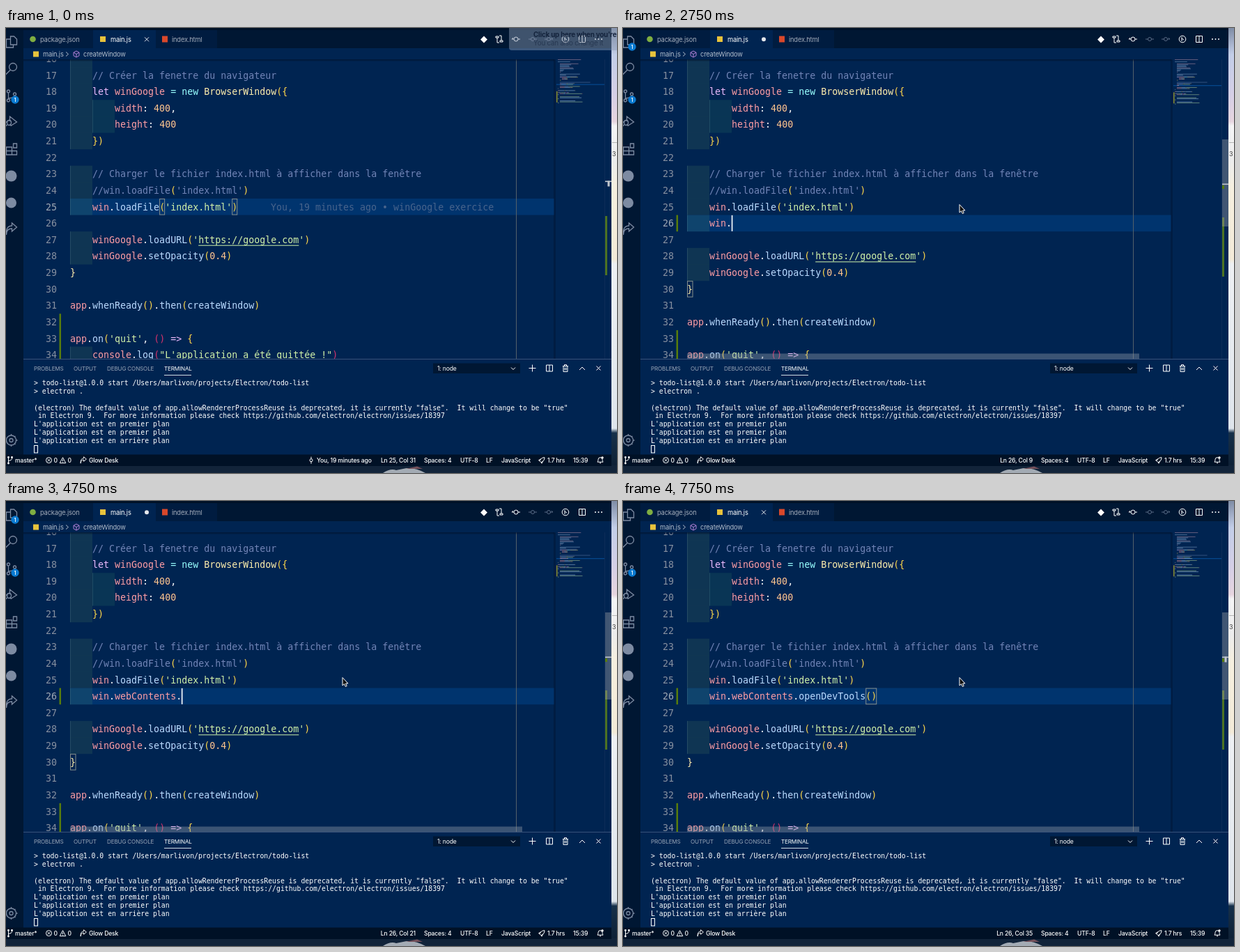
Write an HTML page that moves like this. It is 877x639 px and loops after 8000 ms.

```html
<!DOCTYPE html>
<html lang="fr">
<head>
<meta charset="utf-8">
<title>Code editor</title>
<style>
html, body { margin: 0; width: 100%; height: 100%; overflow: hidden; background: #002451; }
svg { display: block; width: 877px; height: 639px; }
text { white-space: pre; }
.mono { font-family: "DejaVu Sans Mono", monospace; }
.ui { font-family: Inter, "Open Sans", sans-serif; letter-spacing: -0.02em; }
</style>
</head>
<body>
<svg id="stage" viewBox="0 0 877 639" xmlns="http://www.w3.org/2000/svg"></svg>
<script>
const LOOP = 8000, CH = 8.008, ROW = 23.62, LEFT = 92;
const COLOR = {
  c: '#7285b7', k: '#ebbbff', o: '#99ffff', r: '#ff9da4', w: '#ffffff', n: '#ffc58f',
  t: '#ffeead', f: '#bbdaff', s: '#d1f1a9', y: '#ffd84a', m: '#d6336c', u: '#d1f1a9'
};
const OLIVE = '#587c0c', TEAL = '#1b81a8', GREY = '#7d8ba2';

const rowY = n => 67.8 + ROW * (n - 17);
const colX = c => LEFT + c * CH;
const esc = s => s.replace(/&/g, '&amp;').replace(/</g, '&lt;');
const rect = (x, y, w, h, fill, more = '') =>
  `<rect x="${x}" y="${y}" width="${w}" height="${h}" fill="${fill}" ${more}/>`;
const box = (x, y, w, h, stroke, fill = 'none') => rect(x, y, w, h, fill, `stroke="${stroke}"`);
const raw = (cls, x, y, size, fill, body, more = '') =>
  `<text class="${cls}" x="${x}" y="${y}" font-size="${size}" fill="${fill}" ${more}>${body}</text>`;
const mono = (x, cy, s, fill, more) => raw('mono', x, cy + 4.8, 13.3, fill, esc(s), more);
const ui = (x, cy, s, size = 8.6, fill = '#fff', more = '') =>
  raw('ui', x, cy + size * .36, size, fill, esc(s), more);
const icon = (x, y, d, color = '#fff', more = '', scale = 1) =>
  `<path transform="translate(${x} ${y}) scale(${scale})" d="${d}" fill="none" stroke="${color}" ${more}/>`;
const dot = (x, y, r, fill) => `<circle cx="${x}" cy="${y}" r="${r}" fill="${fill}"/>`;
const ring = r => `M${-r} 0a${r} ${r} 0 1 0 ${2 * r} 0a${r} ${r} 0 1 0 ${-2 * r} 0`;
const CROSS = 'M-3 -3L3 3M3 -3L-3 3';
const CUBE = 'M0 -4.5L4 -2.3V2.3L0 4.5L-4 2.3V-2.3ZM-4 -2.3L0 0L4 -2.3M0 0V4.5';
const SHARE = 'M-7 8Q-7 -1 1 -1V3L8 -3L1 -9V-5Q-8 -5 -7 8Z';

// Code lines: indent, then tokens separated by ^, each led by its colour key.
const HEAD = [
  [4, ''],
  [4, 'c// Créer la fenetre du navigateur'],
  [4, 'klet ^rwinGoogle ^o= new ^tBrowserWindow^y({'],
  [8, 'rwidth^w: ^n400^w,'],
  [8, 'rheight^w: ^n400'],
  [4, 'y})'],
  [0, ''],
  [4, 'c// Charger le fichier index.html à afficher dans la fenêtre'],
  [4, "c//win.loadFile^y(^c'index.html'^y)"],
  [4, "rwin^w.^floadFile^y(^s'index.html'^y)"]
];
const TAIL = [
  [0, ''],
  [4, "rwinGoogle^w.^floadURL^y(^s'^uhttps://google.com^s'^y)"],
  [4, 'rwinGoogle^w.^fsetOpacity^y(^n0.4^y)'],
  [0, 't}'],
  [0, ''],
  [0, 'rapp^w.^fwhenReady^y()^w.^fthen^y(^fcreateWindow^y)'],
  [0, ''],
  [0, "rapp^w.^fon^y(^s'quit'^w, ^m()^k => ^y{"],
  [4, 'rconsole^w.^flog^m(^s"L\'application a été quittée !"^m)']
];
const toks = s => s ? s.split('^').map(t => [t[0], t.slice(1)]) : [];
const plain = s => toks(s).map(t => t[1]).join('');

// Suggestion lists: kind letter, then label.
const menu = (q, items, doc) => ({ q, items: items.split(' '), doc });
const LET_WIN = 'let win: Electron.BrowserWi|ndow';
const WEB = '(property) Electron.Browser|Window.webContents: Electr|on.WebContents';
const OPEN = '(method) Electron.WebConten|ts.openDevTools(options?: E|lectron.OpenDevToolsOption|s): void';
const M_W = menu('w', 'vwin vwinGoogle mwebkitCancelAnimationFra… mwebkitConvertPointFromNo… mwebkitConvertPointFromPa… vwebkitRTCPeerConnection mwebkitRequestAnimationFr… vwebkitURL kwhile vwindow kwith awebPreferences', LET_WIN);
const M_WI = menu('wi', 'vwin vwinGoogle vwindow kwith awidth kwhile', LET_WIN);
const M_WIN = menu('win', 'vwin vwinGoogle vwindow', LET_WIN);
const M_P = menu('w', 'vwebContents mshow mshowInactive mpreviewFile mblurWebView mfocusOnWebView munhookWindowMessage mhookWindowMessage', WEB);
const M_WE = menu('we', 'vwebContents mblurWebView mfocusOnWebView awebPreferences', WEB);
const M_WEB = menu('web', 'vwebContents mblurWebView mfocusOnWebView awebPreferences', WEB);
const M_ALL = menu('', 'maddListener maddWorkSpace mcanGoBack mcanGoForward mcanGoToOffset mcapturePage mclearHistory mcloseDevTools mcopy mcopyImageAt mcut mdelete');
const M_OP = menu('op', 'mopenDevTools asetOpacity mprependOnceListener mcopy mcopyImageAt misDevToolsOpened mprintToPDF mstop mstopFindInPage mstopPainting mgetOSProcessId mgetProcessId', OPEN);
const M_OPE = menu('ope', 'mopenDevTools misDevToolsOpened', OPEN);

const WC = 'rwin^w.^rwebContents';
const STEPS = [
  [0, { veil: 1, code: null, caret: 0, pair: [[16, 17], [29, 30]] }],
  [250, { veil: .5 }],
  [500, { veil: 0, mouse: true }],
  [1000, { code: '', pair: null, dirty: true, caret: 1, fresh: true }],
  [1250, { badge: true }],
  [1750, { code: 'rw', menu: M_W }],
  [2000, { code: 'rwi', menu: M_WI, fresh: false }],
  [2250, { code: 'rwin', menu: M_WIN }],
  [2500, { menu: null }],
  [2750, { code: 'rwin^w.' }],
  [3000, { code: 'rwin^w.^rw', menu: M_P }],
  [3250, { code: 'rwin^w.^rwe', menu: M_WE }],
  [3750, { code: 'rwin^w.^rweb', menu: M_WEB }],
  [4250, { code: WC, menu: null }],
  [4750, { code: WC + '^w.' }],
  [5000, { menu: M_ALL }],
  [5500, { code: WC + '^w.^rop', menu: M_OP }],
  [5750, { code: WC + '^w.^rope', menu: M_OPE }],
  [6250, { code: WC + '^w.^ropenDevTools', menu: null }],
  [6750, { code: WC + '^w.^fopenDevTools^y()', back: 1, pair: [[32, 34]] }],
  [7000, { back: 0 }],
  [7500, { dirty: false, badge: false }],
  [7750, { caret: 0 }]
];

function desktop() {
  const stops = [[0, '#7f8da6'], [.06, '#c3cee8'], [.15, '#d5cfe6'], [.21, '#e6d5df'], [.22, '#f5f5f6'],
    [.3, '#ececec'], [.36, '#f6efdf'], [.52, '#f3ead8'], [.53, '#eef0f3'], [.9, '#dfe5ec'], [.91, '#16304a'], [1, '#0c1d31']];
  return `<defs><linearGradient id="sky" x2="0" y2="1">${stops.map(([o, c]) => `<stop offset="${o}" stop-color="${c}"/>`).join('')}</linearGradient>
    <linearGradient id="shade" x2="0" y2="1"><stop stop-color="#00102a" stop-opacity=".7"/><stop offset="1" stop-color="#00102a" stop-opacity="0"/></linearGradient>
    <clipPath id="edit"><rect x="25" y="45" width="844" height="430"/></clipPath></defs>`
    + rect(0, 0, 877, 639, 'url(#sky)') + rect(0, 628, 877, 11, '#12243a')
    + '<path d="M541 639Q552 632 560 635L575 632Q588 631 602 639Z" fill="#a3abb4"/><path d="M574 633L590 629.5L598 633Z" fill="#75505a"/>'
    + ui(870, 181, '3', 9, '#444') + rect(870, 164, 7, 1, '#b5b5b5');
}

function tabs(s) {
  let h = rect(0, 0, 869, 29, '#001733') + rect(0, 0, 869, 3, '#001126')
    + rect(25, 3, 100, 26, '#001c40') + rect(125, 3, 90, 26, '#002451') + rect(215, 3, 88, 26, '#001c40');
  h += dot(38.5, 16, 4.3, '#7fae42') + rect(135, 12, 8, 8, '#e8c33c') + rect(224, 11.5, 8, 9, '#d9482b') + rect(39, 33.5, 8, 8, '#e8c33c');
  h += ui(49, 16.5, 'package.json', 9.3, '#a3acba') + ui(150, 16.5, 'main.js', 9.3) + ui(238, 16.5, 'index.html', 9.3, '#a3acba');
  h += s.dirty ? dot(202, 16.3, 3, '#e4e7ec') : icon(202, 16.3, CROSS, '#e4e7ec');
  h += ui(53, 37.5, 'main.js', 9.3, '#b2bccb') + icon(88, 37.5, 'M-2 -3L1.5 0L-2 3', '#b2bccb')
    + icon(101, 37.5, CUBE, '#b180d7') + ui(111, 37.5, 'createWindow', 9.3, '#b2bccb');
  h += rect(682.5, 13, 7, 7, '#fff', 'transform="rotate(45 686 16.5)"');
  h += icon(708, 16, 'M-3 -2V5H0M3 2V-5H0M-5 -4H-1V-2H-5ZM1 4H5V2H1Z');
  h += icon(732, 16, ring(3) + 'M-3 0H-6L-4 -2M3 0H6');
  h += icon(756, 16, ring(2.5) + 'M-2.5 0H-6M2.5 0H6', '#5a6b85') + icon(779, 16, ring(2.5) + 'M-2.5 0H-6M2.5 0H6L4 -2', '#5a6b85');
  h += icon(803, 16, ring(4.8) + 'M-1 -3V3M-1 -1L2 1') + icon(827, 16, 'M-4.5 -4.5H4.5V4.5H-4.5ZM0 -4.5V4.5');
  return h + [846, 850.5, 855].map(x => dot(x, 16, 1, '#fff')).join('');
}

function sidebar(s) {
  const st = 'stroke-width="1.3"';
  let h = rect(0, 3, 25, 610, '#001733');
  const icons = [
    [20, 'M-1 -8H4L8 -4V4H-1ZM-1 -4H-7V8H3V4'],
    [58, 'M-3 -2a5.5 5.5 0 1 1 11 0a5.5 5.5 0 1 1 -11 0M-1 2L-8 9'],
    [97, 'M-6 -6a2 2 0 1 0 4 0a2 2 0 1 0 -4 0M-4 -4V5M-6 7a2 2 0 1 0 4 0a2 2 0 1 0 -4 0M3 -2a2 2 0 1 0 4 0a2 2 0 1 0 -4 0M5 0Q5 3 -4 4'],
    [135, 'M-2 -1V-8L8 0L0 5M-6 1a3 3.5 0 1 0 6 0a3 3.5 0 1 0 -6 0M-8 0H-6M-8 6L-6 4M0 6L-1 4'],
    [174, 'M-7 -3H1V8H-7ZM-7 2.5H8V8H1M1 2.5V-3M3 -8H8V-2H3Z'],
    [289, SHARE],
    [592, ring(7) + ring(2.5) + 'M0 -9V-7M0 7V9M7 0H9M-9 0H-7M5 -5L6 -6M5 5L6 6']
  ];
  h += icons.map(([y, d]) => icon(7.5, y, d, GREY, st)).join('');
  h += dot(7.5, 212.5, 8, GREY) + dot(7.5, 251, 7.5, GREY);
  const badge = y => dot(13, y, 5.7, '#0a7ad1') + ui(13, y, '1', 7, '#fff', 'text-anchor="middle" font-weight="600"');
  return h + badge(103) + (s.badge ? badge(27) : '');
}

function codeRow([indent, src], n, hot) {
  const y = rowY(n), top = y - ROW / 2;
  let h = hot ? rect(LEFT, top, 695, ROW, '#00346e') : '';
  for (let i = 0; i < indent; i += 4)
    h += rect(colX(i), top, 4 * CH, ROW + .1, i ? 'rgba(110,255,127,.08)' : 'rgba(190,255,100,.08)')
      + rect(colX(i), top, 1, ROW + .1, 'rgba(130,170,170,.2)');
  const body = toks(src).map(([c, t]) => `<tspan fill="${COLOR[c]}">${esc(t)}</tspan>`).join('');
  const link = src.indexOf('^u');
  if (link > 0) {
    const at = indent + plain(src.slice(0, link)).length;
    h += rect(colX(at), y + 7.7, 18 * CH, 1, '#d1f1a9');
  }
  return h + mono(73, y, String(n), hot ? '#a0a8b4' : '#8790a0', 'text-anchor="end"')
    + raw('mono', colX(indent), y + 4.8, 13.3, '#fff', body);
}

function minimap(lines, hotLine) {
  const y = n => 45 + (n - 1) * 1.48;
  const top = [45, 0, 24, 0, 36, 22, 18, 19, 26, 27, 8, 6, 2, 0, 39, 12], end = [2, 0, 38, 42, 2, 0, 30, 44, 2];
  let h = rect(786, 45, 3, 430, 'rgba(0,12,32,.3)') + rect(790, y(hotLine), 69, 1.3, '#06468a');
  const bar = (n, at, len, c) => rect(792 + at * .74, y(n), len * .74, .9, c, 'opacity=".5"');
  top.forEach((len, i) => { h += bar(i + 1, i > 3 ? 4 : 0, len, i % 4 ? '#9fbbdf' : '#d9a0b0'); });
  lines.forEach(([indent, src], i) => {
    let at = indent;
    toks(src).forEach(([c, t]) => { h += bar(i + 16, at, t.length, COLOR[c]); at += t.length; });
  });
  const next = 16 + lines.length;
  end.forEach((len, i) => { h += bar(next + i, len > 2 && i % 4 ? 4 : 0, len, i % 3 ? '#d1f1a9' : '#bbdaff'); });
  return h + rect(790, y(next - 3), 1.5, 16, '#8b8b2c');
}

function editor(s) {
  const added = s.code !== null, hot = added ? 26 : 25;
  const lines = [...HEAD, ...(added ? [[4, s.code]] : []), ...TAIL];
  let h = rect(25, 29, 844, 446, '#002451') + '<g clip-path="url(#edit)">';
  lines.forEach((l, i) => { if (i < 19) h += codeRow(l, 16 + i, 16 + i === hot); });
  const mark = (n, count, c) => rect(76.5, rowY(n) - ROW / 2, 2.5, ROW * count, c);
  h += mark(added ? 33 : 32, 3, OLIVE);
  if (added) h += mark(26, 1, s.fresh ? TEAL : OLIVE) + (s.fresh ? mark(27, 1, OLIVE) : '');
  else h += mono(380, rowY(25), 'You, 19 minutes ago • winGoogle exercice', '#48648c');
  if (s.pair) h += s.pair.map(([a, b]) => box(colX(a) + .5, rowY(hot) - 11.3, (b - a) * CH - 1, 22.6, '#888f8c')).join('');
  else h += box(92.5, rowY(30) - 11.3, 7.5, 22.6, '#888f8c');
  h += rect(732, 45, 1, 430, '#53616a') + minimap(lines, hot);
  h += rect(25, 45, 762, 3.5, 'url(#shade)') + rect(859, 45, 1, 430, '#0d2c58');
  h += rect(860, added ? 272 : 270, 3, 85, '#4c7222');
  if (s.mouse) h += rect(860, 160, 9, 125, 'rgba(160,160,165,.4)');
  if (added) {
    h += rect(92, 467.5, 649, 8, 'rgba(140,150,165,.42)');
    h += rect(860, 226, 3, s.fresh ? 11 : 5, s.fresh ? TEAL : OLIVE);
  }
  const line = added ? 223.5 : 219.5;
  h += rect(860, line, 9, 1.6, '#c2c7ce');
  if (s.pair) h += rect(863.5, line, 3, 8, '#c2c7ce');
  h += '</g>';
  if (s.caret) h += rect(caretX(s) - .3, rowY(hot) - 11.5, 1.6, 23, '#fff');
  return h;
}

const column = s => s.code === null ? 31 : 5 + plain(s.code).length - (s.back || 0);
const caretX = s => colX(column(s) - 1);

function panel() {
  let h = rect(25, 475, 844, 138, '#002451') + rect(25, 475, 844, 1, '#39517a');
  [[40, 'PROBLEMS'], [97, 'OUTPUT'], [145, 'DEBUG CONSOLE'], [227, 'TERMINAL']].forEach(([x, t], i) => {
    h += ui(x, 489.3, t, 8.1, i === 3 ? '#fff' : '#98a4b6');
  });
  h += rect(227, 498, 39, 1, '#d5dae2') + rect(613, 481.5, 125, 14.5, '#001733') + ui(619, 489.3, '1: node', 8.6)
    + icon(728, 489, 'M-3 -1.5L0 1.5L3 -1.5');
  h += icon(755.5, 488.5, 'M-5 0H5M0 -5V5') + icon(780, 488.5, 'M-4.5 -4.5H4.5V4.5H-4.5ZM0 -4.5V4.5')
    + icon(803, 488.5, 'M-4 -3H4M-1.5 -3V-5H1.5V-3M-3 -3V5H3V-3M-1 -1V3M1 -1V3')
    + icon(827, 489, 'M-4 2L0 -2L4 2') + icon(850.5, 488.5, CROSS);
  const out = ['> todo-list@1.0.0 start /Users/marlivon/projects/Electron/todo-list', '> electron .', '',
    '(electron) The default value of app.allowRendererProcessReuse is deprecated, it is currently "false".  It will change to be "true"',
    ' in Electron 9.  For more information please check https://github.com/electron/electron/issues/18397',
    "L'application est en premier plan", "L'application est en premier plan", "L'application est en arrière plan"];
  out.forEach((t, i) => { h += raw('mono', 40, 513.1 + i * 11.83, 9.81, '#fff', esc(t)); });
  return h + box(40.5, 599.5, 5, 10.5, '#fff');
}

function status(s) {
  const y = 620.7, put = (x, t, more = '') => ui(x, y, t, 8.6, '#fff', 'font-weight="500" ' + more);
  let h = rect(0, 612.5, 869, 16.5, '#001126');
  h += icon(5.5, y, 'M-2 -4V4M3 -4V-2Q3 0 -2 1') + dot(3.5, 616.5, 1.4, '#fff') + dot(3.5, 625, 1.4, '#fff') + dot(8.5, 616.5, 1.4, '#fff');
  h += put(13, 'master*') + icon(61.5, y, ring(4) + 'M-1.7 -1.7L1.7 1.7M1.7 -1.7L-1.7 1.7') + put(68.5, '0')
    + icon(81.5, y, 'M0 -4L4.3 4H-4.3ZM0 -1V1.5M0 2.3V3') + put(88.5, '0');
  h += icon(111, y, SHARE, '#fff', 'stroke-width="1.7"', .55) + put(119, 'Glow Desk');
  if (s.code === null) h += icon(438, y, ring(2) + 'M0 -5V-2M0 2V5') + put(446, 'You, 19 minutes ago');
  h += put(588, `Ln ${s.code === null ? 25 : 26}, Col ${column(s)}`, 'text-anchor="end"');
  [[600, 'Spaces: 4'], [652, 'UTF-8'], [689, 'LF'], [711, 'JavaScript'], [777, '1.7 hrs'], [814, '15:39']].forEach(([x, t]) => { h += put(x, t); });
  return h + icon(769, y, 'M4 -4Q-1 -4 -3 1L-1 3Q4 1 4 -4ZM-3 1L-4.5 0L-1 -2M-1 3L0 4.5L2 1')
    + icon(853, y, 'M-4 2.5Q-3 1 -3 -1a3 3 0 0 1 6 0Q3 1 4 2.5ZM-1 4H1') + dot(856, 617, 1.7, '#fff');
}

// Indexes of the letters in a label that match the typed text.
function hits(label, q) {
  const low = label.toLowerCase(), at = q ? low.indexOf(q) : -1;
  if (at >= 0) return [...q].map((_, i) => at + i);
  let from = 0;
  const found = [];
  for (const ch of q) {
    const i = low.indexOf(ch, from);
    if (i < 0) break;
    found.push(i);
    from = i + 1;
  }
  return found;
}

function kindIcon(kind, x, y) {
  if (kind === 'm') return icon(x, y, CUBE, '#b180d7');
  if (kind === 'v') return icon(x, y, 'M-3 -3H-5V3H-3M3 -3H5V3H3', '#75beff') + icon(x, y, 'M-2 0L0 -2L2 -1V1L0 2L-2 1ZM-2 0L2 -1', '#75beff', 'stroke-width=".9"');
  if (kind === 'k') return icon(x, y, 'M-5 -3H1M3 -3H5M-5 0H-1M1 0H5M-5 3H2M4 3H5', '#c5cbd5');
  return ui(x - 5, y, 'abc', 6.5, '#d5dae2');
}

function docText(x) {
  const chip = (dx, y, t) => rect(x + dx - 3, y - 8.5, t.length * CH + 6, 17, 'rgba(0,8,22,.5)', 'rx="2"') + mono(x + dx, y - .3, t, '#fff');
  const say = (dx, y, t) => ui(x + dx, y - .3, t, 12.2, '#fff', 'font-weight="500"');
  return say(0, 414, 'Opens the devtools.')
    + say(0, 451, 'When') + chip(42, 451, 'contents') + say(114, 451, 'is a') + chip(141, 451, '<webview>')
    + say(0, 475, 'tag, the') + chip(51, 475, 'mode') + say(92, 475, 'would be') + chip(151, 475, 'detach') + say(207, 475, 'by')
    + say(0, 498.5, 'default, explicitly passing an empty')
    + chip(4, 522, 'mode') + say(45, 522, 'can force using last used dock') + say(0, 546, 'state.');
}

function popup(s) {
  const { q, items, doc } = s.menu, x = caretX(s) + .5, y0 = 293, edge = '#3f5270';
  let h = box(x, y0 + .5, 243, items.length * ROW - .5, edge, '#001c40') + rect(x, y0 + .5, 243, ROW, '#607188');
  items.forEach((it, i) => {
    const y = rowY(27) + 1 + i * ROW, label = it.slice(1), hit = hits(label, q);
    const body = [...label].map((c, j) => hit.includes(j) ? `<tspan fill="#a9d4ff" stroke="none" font-weight="700">${c}</tspan>` : c).join('');
    h += kindIcon(it[0], x + 7.5, y) + raw('mono', x + 16.5, y + 4.8, 13.3, '#fff', body, 'stroke="#fff" stroke-width=".25"');
  });
  if (items.length === 12 && q !== 'w') h += rect(x + 235, 317, 7.5, 107, 'rgba(130,145,165,.45)');
  if (!doc) return h;
  const dx = x + 243.5, rows = doc.split('|'), long = doc === OPEN;
  h += box(dx, y0 + .5, 243, long ? 268 : rows.length * ROW + 30.5, edge, '#001c40');
  rows.forEach((t, i) => { h += mono(dx + 4.5, 307.3 + i * ROW, t, '#c6ced9'); });
  return h + icon(dx + 229, 300, 'M-2.5 -2.5L2.5 2.5M2.5 -2.5L-2.5 2.5', '#e4e7ec') + (long ? docText(dx + 4.5) : '');
}

const veil = a => `<g opacity="${a}">` + rect(722, -6, 160, 38, 'rgba(140,155,180,.45)', 'rx="4"')
  + ui(757, 9.3, "Click up here when you're", 9.8, '#14233c', 'font-weight="700"')
  + ui(757, 21.5, 'You can also change it', 9.8, 'rgba(20,35,60,.55)') + '</g>';

const pointer = () => `<path transform="translate(483 253.5)" d="M0 0V11.5L2.6 9.2L4.3 13L6.2 12.1L4.6 8.5H8Z" fill="#111" stroke="#fff" stroke-width="1"/>`;

const stage = document.getElementById('stage');
const start = performance.now();
let shown = -1;

function draw(index) {
  const s = Object.assign({}, ...STEPS.slice(0, index + 1).map(p => p[1]));
  stage.innerHTML = desktop() + editor(s) + tabs(s) + panel() + sidebar(s) + status(s)
    + (s.menu ? popup(s) : '') + (s.mouse ? pointer() : '') + (s.veil ? veil(s.veil) : '');
}

function tick() {
  const t = Math.max(0, performance.now() - start) % LOOP;
  const index = STEPS.filter(p => p[0] <= t).length - 1;
  if (index !== shown) draw(shown = index);
  requestAnimationFrame(tick);
}
tick();
</script>
</body>
</html>
```
